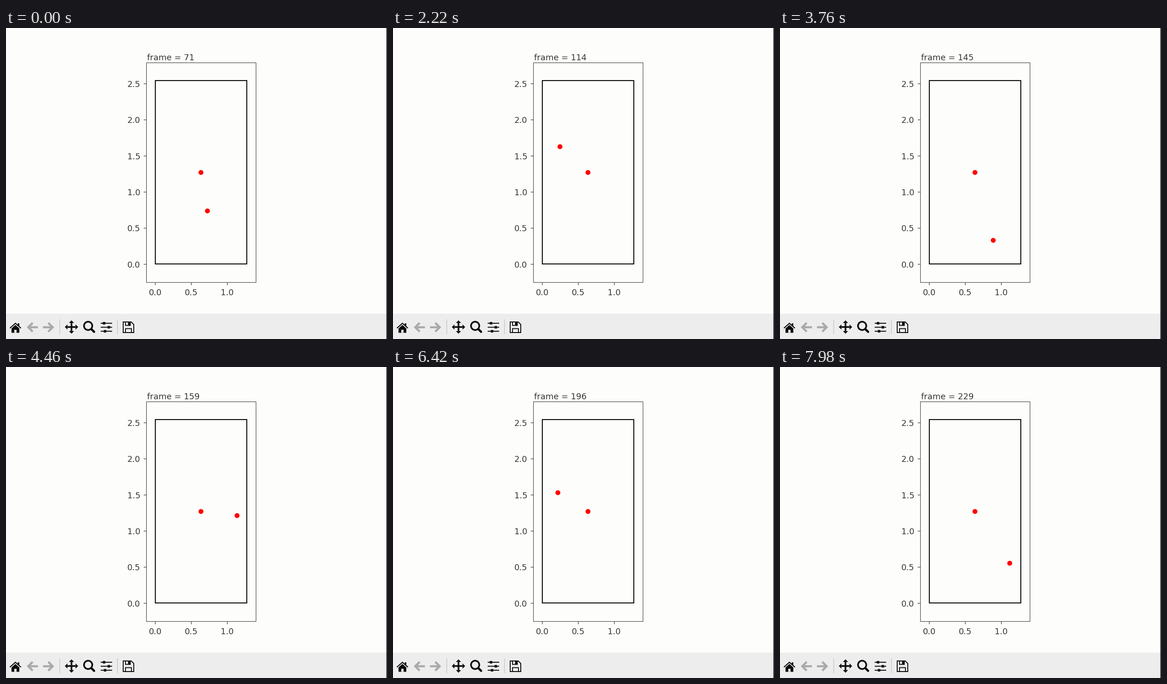
Write a matplotlib script that moves like this. It is 829x675 px and loops after 8 s.

```python
import math
import numpy as np
import matplotlib.pyplot as plt
from matplotlib.animation import FuncAnimation
from matplotlib.patches import Circle, Polygon, Rectangle

W, H, DPI = 829, 675, 128
PT = 72 / DPI  # points per pixel
TICK = 20      # ms per drawn frame
LOOP = 8000

INK = "#363636"
ICON = "#0c0c0c"
MUTED = "#a9a9a9"
PAPER = "#fdfdfb"
BAR = "#ededed"

plt.rcParams["font.family"] = "DejaVu Sans"
plt.rcParams["path.snap"] = False
fig = plt.figure(figsize=(W / DPI, H / DPI), dpi=DPI, facecolor=PAPER)
ax = fig.add_axes([0, 0, 1, 1])
ax.set_xlim(0, W)
ax.set_ylim(H, 0)
ax.axis("off")


def line(points, width, color=ICON, cap="butt"):
    xs, ys = zip(*points)
    ax.plot(xs, ys, color=color, lw=width * PT, solid_capstyle=cap,
            solid_joinstyle="miter")


def rect(x, y, w, h, fill="none", edge="none", width=0):
    ax.add_patch(Rectangle((x, y), w, h, facecolor=fill, edgecolor=edge,
                           lw=width * PT, joinstyle="miter"))


def poly(points, fill=ICON, edge="none", width=0):
    ax.add_patch(Polygon(points, closed=True, facecolor=fill, edgecolor=edge,
                         lw=width * PT))


def disc(x, y, r=5.3, **style):
    return ax.add_patch(Circle((x, y), r, **(style or {"color": "red", "lw": 0})))


def label(x, y, text, ha):
    return ax.text(x, y, text, ha=ha, va="baseline", color=INK, fontsize=18 * PT)


# ---- plot area: a 1.27 x 2.54 table inside axes with a 10 % margin ----
X0, Y0, UNIT = 324.9, 512.6, 156.7
TW, TH = 1.27 * UNIT, 2.54 * UNIT


def draw_plot():
    left, bottom = X0 - 0.1 * TW + 0.6, Y0 + 0.1 * TH - 0.1
    rect(left, bottom, 1.2 * TW - 0.4, -1.2 * TH + 0.8, edge="#3a3a36", width=1.1)
    for i in range(6):
        value = i / 2
        y = Y0 - value * UNIT + 0.2
        line([(left - 6, y), (left, y)], 1.2, INK)
        label(292.2, y + 6.8, f"{value:.1f}", "right")
        if i < 3:
            x = X0 + value * UNIT
            line([(x, bottom), (x, bottom + 6)], 1.2, INK)
            label(x, 579.6, f"{value:.1f}", "center")
    rect(X0, Y0 - 0.5, TW, -TH, edge="black", width=2)


# ---- toolbar icons, each around its own centre ----
MID = 649.5


def home(x):
    line([(x - 12, MID + 2), (x, MID - 8.6), (x + 12, MID + 2)], 2.2)
    rect(x + 5, MID - 8.5, 3.5, 6, ICON)
    poly([(x, MID - 5), (x + 8.5, MID + 2.7), (x + 8.5, MID + 12),
          (x - 8.5, MID + 12), (x - 8.5, MID + 2.7)])
    rect(x - 2.5, MID + 5.5, 5, 6.6, BAR)


def arrow(x, way):
    tip = x + way * 9
    line([(tip - way * 9.5, MID - 9.5), (tip, MID), (tip - way * 9.5, MID + 9.5)],
         4.6, MUTED)
    line([(tip, MID), (x - way * 12, MID)], 4.4, MUTED)


def move(x, y):
    for dx, dy in [(1, 0), (-1, 0), (0, 1), (0, -1)]:
        bx, by = x + 8.8 * dx, y + 8.8 * dy
        line([(x, y), (bx, by)], 3.6)
        poly([(x + 14.5 * dx, y + 14.5 * dy),
              (bx + 5.6 * dy, by + 5.6 * dx),
              (bx - 5.6 * dy, by - 5.6 * dx)])


def zoom(x, y):
    disc(x, y, 9, facecolor="none", edgecolor=ICON, lw=3.6 * PT)
    line([(x + 7, y + 7), (x + 13, y + 13)], 4.8, cap="round")


def sliders(x):
    for row, shift in zip((-1, 0, 1), (-5.2, 5.2, -3)):
        y = MID + 8.7 * row
        line([(x - 12.5, y), (x + 12.5, y)], 2)
        rect(x + shift - 2.7, y - 2.7, 5.4, 5.4, ICON)


def floppy(x):
    r = 11.5
    poly([(x - r, MID - r), (x + 6, MID - r), (x + r, MID - 6), (x + r, MID + r),
          (x - r, MID + r)], fill="none", edge=ICON, width=2)
    rect(x - 6.5, MID + 3, 13, r - 3, edge=ICON, width=1.9)
    rect(x - 6.5, MID - r, 10.5, 7.5, edge=ICON, width=1.9)
    rect(x - 1, MID - r, 4.5, 7, ICON)


def draw_toolbar():
    rect(0, 620, W, H - 620, BAR)
    home(20.5)
    arrow(57.5, -1)
    arrow(92.5, 1)
    move(142.5, MID - 0.5)
    zoom(178.7, MID - 3)
    sliders(218.5)
    floppy(266.5)
    for x in (117, 242.5):
        line([(x, MID - 17), (x, MID + 15)], 1.1, "#bcbcbc")


draw_plot()
draw_toolbar()
rect(827.7, 0, W - 827.7, H, "#1a1a1a")

# ---- moving parts ----
FIRST = 71
PACE = [(0, 0), (30, 25), (96, 88), (138, 125), (172, 158)]  # redraws, counts

title = label(307, 69.7, "", "left")
disc(X0 + TW / 2 - 0.2, Y0 - TH / 2)
ball = disc(0, 0)


def redraws(t):
    """Redraws come in bursts of 18 over 740 ms, followed by a short rest."""
    burst, rest = divmod(t + 20, 840)
    return burst * 18 + min(17, rest * 17 // 740)


def bounce(start, speed, n, low, high):
    span = high - low
    pos = (start + speed * n - low) % (2 * span)
    return low + min(pos, 2 * span - pos)


def update(i):
    n = math.ceil(np.interp(redraws(i * TICK), *zip(*PACE)) - 1e-6)
    title.set_text(f"frame = {FIRST + n}")
    ball.center = (X0 + bounce(113.4, 5.693, n, 0.5, 198.3),
                   Y0 - bounce(115.6, 9.888, n, 0.1, 397.9))
    return title, ball


anim = FuncAnimation(fig, update, frames=LOOP // TICK, interval=TICK,
                     init_func=lambda: update(0), repeat=True, repeat_delay=0,
                     blit=False)
plt.show()
```
